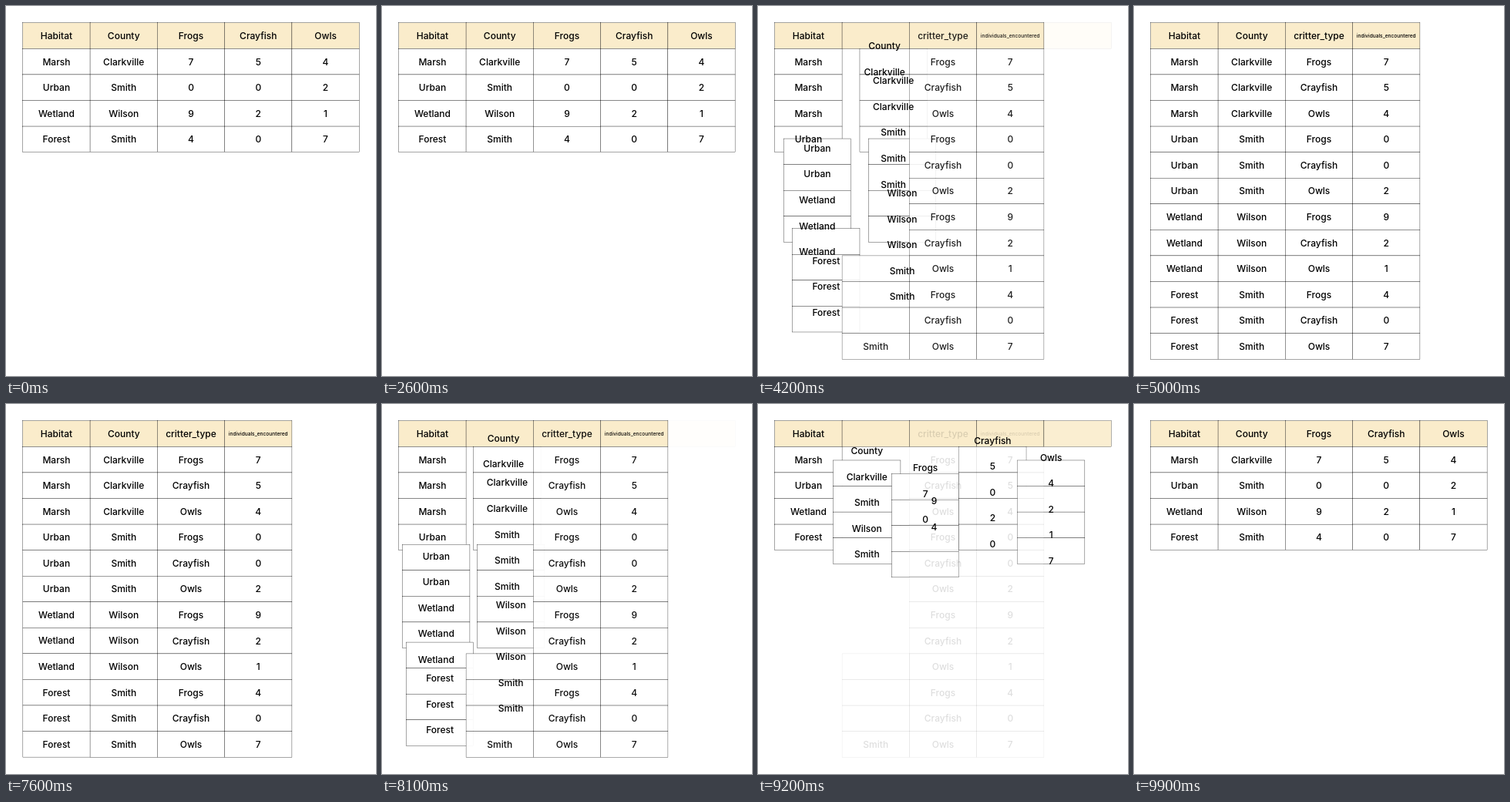
Animation of 480x480 px, one loop 10000 ms. Source, as an HTML page with a canvas:

```html
<!DOCTYPE html>
<html lang="en">
<head>
<meta charset="utf-8">
<title>Wide to long table</title>
<style>
  html, body { margin: 0; height: 100%; overflow: hidden; background: #fff; }
  canvas { display: block; }
</style>
</head>
<body>
<canvas id="stage" width="480" height="480"></canvas>
<script>
const ctx = document.getElementById('stage').getContext('2d');

const MARGIN = 480 / 22;
const CELL_W = (480 - 2 * MARGIN) / 5;
const CELL_H = (480 - 2 * MARGIN) / 13;
const FRAME_MS = 100;
const LOOP_MS = 10000;
const TWEEN_FRAMES = 25;

const wide = [
  ['Habitat', 'Marsh', 'Urban', 'Wetland', 'Forest'],
  ['County', 'Clarkville', 'Smith', 'Wilson', 'Smith'],
  ['Frogs', '7', '0', '9', '4'],
  ['Crayfish', '5', '0', '2', '0'],
  ['Owls', '4', '2', '1', '7']
];

const [habitats, counties, ...critters] = wide;
const long = [['Habitat'], ['County'], ['critter_type'], ['individuals_encountered']];
for (let row = 1; row < habitats.length; row++) {
  for (const critter of critters) {
    [habitats[row], counties[row], critter[0], critter[row]]
      .forEach((value, col) => long[col].push(value));
  }
}

// Cells are listed column by column; equal list positions morph into each other.
const listCells = table => table.flatMap((column, col) =>
  column.map((label, row) => ({ label, col, row })));
const pairUp = (from, to) =>
  Array.from({ length: Math.max(from.length, to.length) }, (_, i) => [from[i], to[i]]);

const wideCells = listCells(wide);
const longCells = listCells(long);
const isHeader = cell => cell.row === 0;
const isBody = cell => cell.row > 0;
const headers = pairUp(wideCells.filter(isHeader), longCells.filter(isHeader));
const bodies = pairUp(wideCells.filter(isBody), longCells.filter(isBody));
const labels = pairUp(wideCells, longCells);

const clamp = v => Math.min(1, Math.max(0, v));
const easeCubic = p => p < 0.5 ? 4 * p ** 3 : 1 - 4 * (1 - p) ** 3;
const mix = (a, b, share) => a + (b - a) * share;

// Cells without a partner stay in place and fade.
function place([from, to], share) {
  const start = from || to, end = to || from;
  ctx.globalAlpha = !from ? share : !to ? 1 - share : 1;
  return {
    x: MARGIN + CELL_W * mix(start.col, end.col, share),
    y: MARGIN + CELL_H * mix(start.row, end.row, share)
  };
}

function drawBox(pair, share, fill) {
  const { x, y } = place(pair, share);
  ctx.fillStyle = fill;
  ctx.fillRect(x, y, CELL_W, CELL_H);
  ctx.strokeRect(x, y, CELL_W, CELL_H);
}

function drawLabel(pair, share, showLong) {
  const { x, y } = place(pair, share);
  const { label } = (showLong ? pair[1] : pair[0]) || pair[1];
  const size = label.length > 15 ? 6.6 : 12;
  ctx.font = `500 ${size}px Inter, sans-serif`;
  ctx.fillStyle = '#000';
  ctx.fillText(label, x + CELL_W / 2, y + CELL_H / 2 + size * 0.364);
}

function draw(time) {
  const frame = Math.floor(time % LOOP_MS / FRAME_MS);
  const progress = clamp((frame < 50 ? frame - 25 : 100 - frame) / TWEEN_FRAMES);
  const share = easeCubic(progress);

  ctx.globalAlpha = 1;
  ctx.fillStyle = '#fff';
  ctx.fillRect(0, 0, 480, 480);
  ctx.strokeStyle = '#000';
  ctx.lineWidth = 0.35;
  ctx.textAlign = 'center';

  headers.forEach(pair => drawBox(pair, share, '#faeccb'));
  bodies.forEach(pair => drawBox(pair, share, '#fff'));
  labels.forEach(pair => drawLabel(pair, share, progress > 0.5));
}

function tick() {
  draw(performance.now());
  requestAnimationFrame(tick);
}
tick();
</script>
</body>
</html>
```
